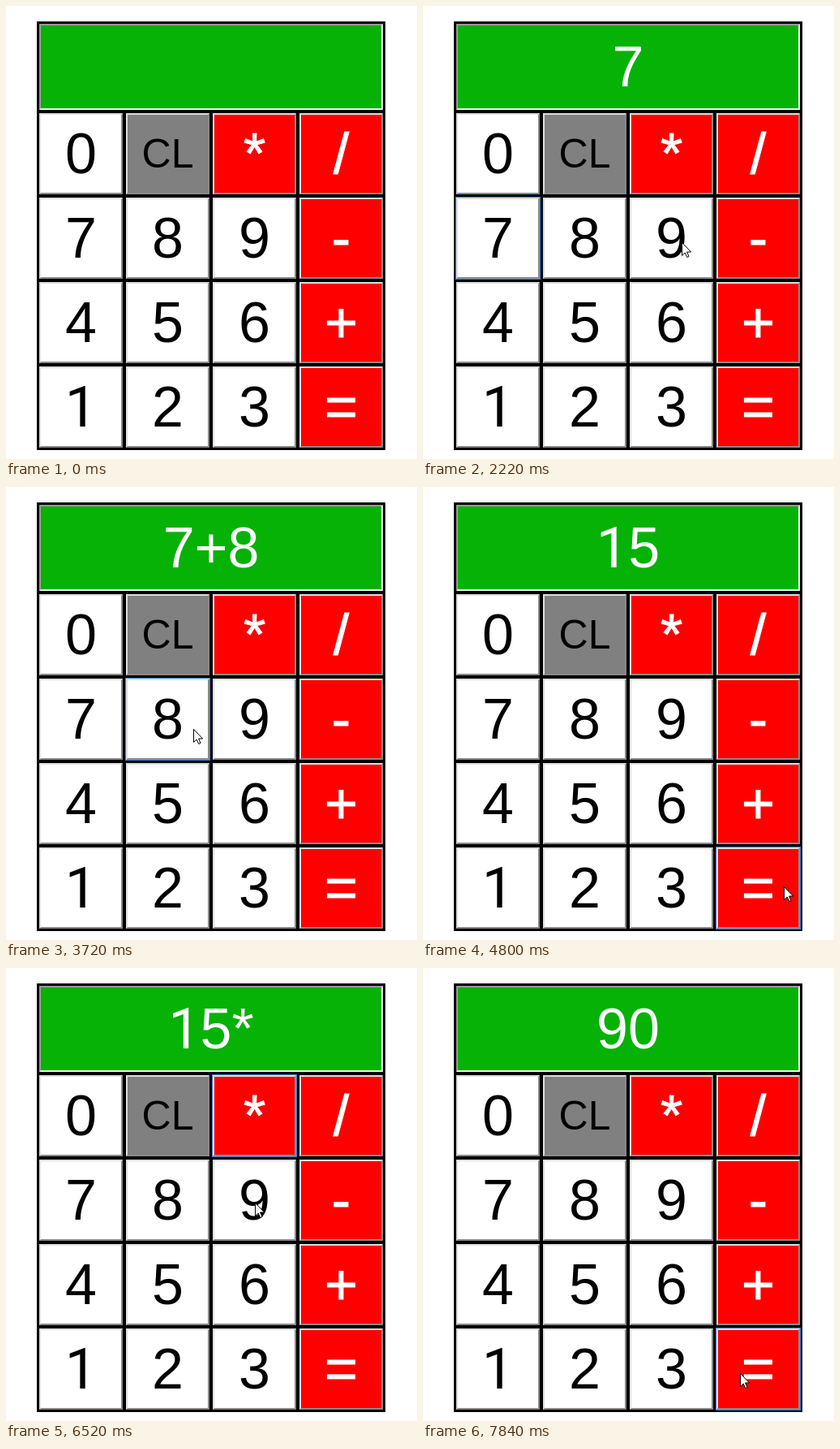
Recreate the animation shown at these times as an HTML page. Size 507 px wide and 558 px high, loop 8 s.

```html
<!DOCTYPE html>
<html lang="en">
<head>
<meta charset="utf-8">
<title>Calculator</title>
<style>
  html, body { margin: 0; width: 100%; height: 100%; overflow: hidden; background: #fff; }
  #calculator {
    position: absolute; left: 38px; top: 19px;
    display: grid; gap: 4px;
    grid-template: 106px repeat(4, 100px) / repeat(4, 103px);
    border: 3px solid #000; background: #000;
    font: 70px "Liberation Sans", Arial, sans-serif;
  }
  #calculator > div {
    display: flex; align-items: center; justify-content: center;
    box-sizing: border-box; min-width: 0; min-height: 0;
    border: 2px outset #ddd;
    background: #fff; color: #000;
  }
  #calculator > #display {
    grid-column: 1 / -1;
    border: 2px inset #eee;
    background: #06b206; color: #fff;
  }
  #calculator > .operator { background: #f00; color: #fff; -webkit-text-stroke: 1px #fff; }
  #calculator > .clear { background: #808080; font-size: 50px; }
  #calculator > .focused { outline: 1px solid #4080d8; }
  #calculator > .pressed { border-style: inset; }
  .one { font-family: Roboto, sans-serif; }
  #cursor { position: absolute; left: 0; top: 0; overflow: visible; }
</style>
</head>
<body>
<div id="calculator"><div id="display"></div></div>
<svg id="cursor" width="12" height="19">
  <path d="M.5 .5V16.5L4.2 13L6.7 18.5L9 17.5L6.6 12H11.6Z" fill="#fff" stroke="#000"/>
</svg>
<script>
const LOOP = 8000;
const HOLD = 80; // ms: pause before a press, and length of the press
const ENTRY = [428, 560];

// The cursor leaves its last place, curves towards `via`, and presses `key` at `to`
const clicks = [
  { key: "7", leave: 200, press: 1500, to: [127, 271], via: [250, 230] },
  { key: "+", leave: 1900, press: 2790, to: [402, 385], via: [400, 264] },
  { key: "8", leave: 3100, press: 3635, to: [231, 298] },
  { key: "=", leave: 3800, press: 4385, to: [445, 496] },
  { key: "*", leave: 4780, press: 5970, to: [320, 185], via: [446, 412] },
  { key: "6", leave: 6150, press: 6985, to: [297, 373] },
  { key: "=", leave: 7200, press: 7755, to: [391, 499] }
];

const calculator = document.getElementById("calculator");
const display = document.getElementById("display");
const cursor = document.getElementById("cursor");
const keys = {};

// A "1" without a foot needs its own face
function setText(element, text) {
  element.innerHTML = text.replaceAll("1", '<span class="one">1</span>');
}

for (const label of "0 CL * / 7 8 9 - 4 5 6 + 1 2 3 =".split(" ")) {
  const key = keys[label] = document.createElement("div");
  setText(key, label);
  if (label === "CL") key.className = "clear";
  else if ("*/-+=".includes(label)) key.className = "operator";
  calculator.append(key);
}

function enter(text, key) {
  if (key !== "=") return text + key;
  const [, a, operator, b] = text.match(/(\d+)(\D)(\d+)/);
  return String(operator === "+" ? +a + +b : a * b);
}

function cursorAt(t) {
  const index = clicks.findLastIndex(click => click.leave <= t);
  if (index < 0) return ENTRY;
  const { leave, press, to, via } = clicks[index];
  const from = index ? clicks[index - 1].to : ENTRY;
  const progress = Math.min(1, (t - leave) / (press - HOLD - leave));
  const u = 1 - (1 - progress) ** 1.2;
  return from.map((start, axis) => {
    const bend = via ? via[axis] : (start + to[axis]) / 2;
    return Math.round((1 - u) ** 2 * start + 2 * u * (1 - u) * bend + u * u * to[axis]);
  });
}

function draw(t) {
  const [x, y] = cursorAt(t);
  cursor.style.transform = `translate(${x}px, ${y}px)`;

  const last = clicks.findLast(click => click.press <= t);
  for (const label in keys) {
    const focused = label === last?.key;
    keys[label].classList.toggle("focused", focused);
    keys[label].classList.toggle("pressed", focused && t < last.press + HOLD);
  }

  const entered = clicks.filter(click => click.press + HOLD <= t);
  setText(display, entered.reduce((text, click) => enter(text, click.key), ""));
}

const begin = performance.now();
function tick() {
  draw((performance.now() - begin) % LOOP);
  requestAnimationFrame(tick);
}
tick();
</script>
</body>
</html>
```
